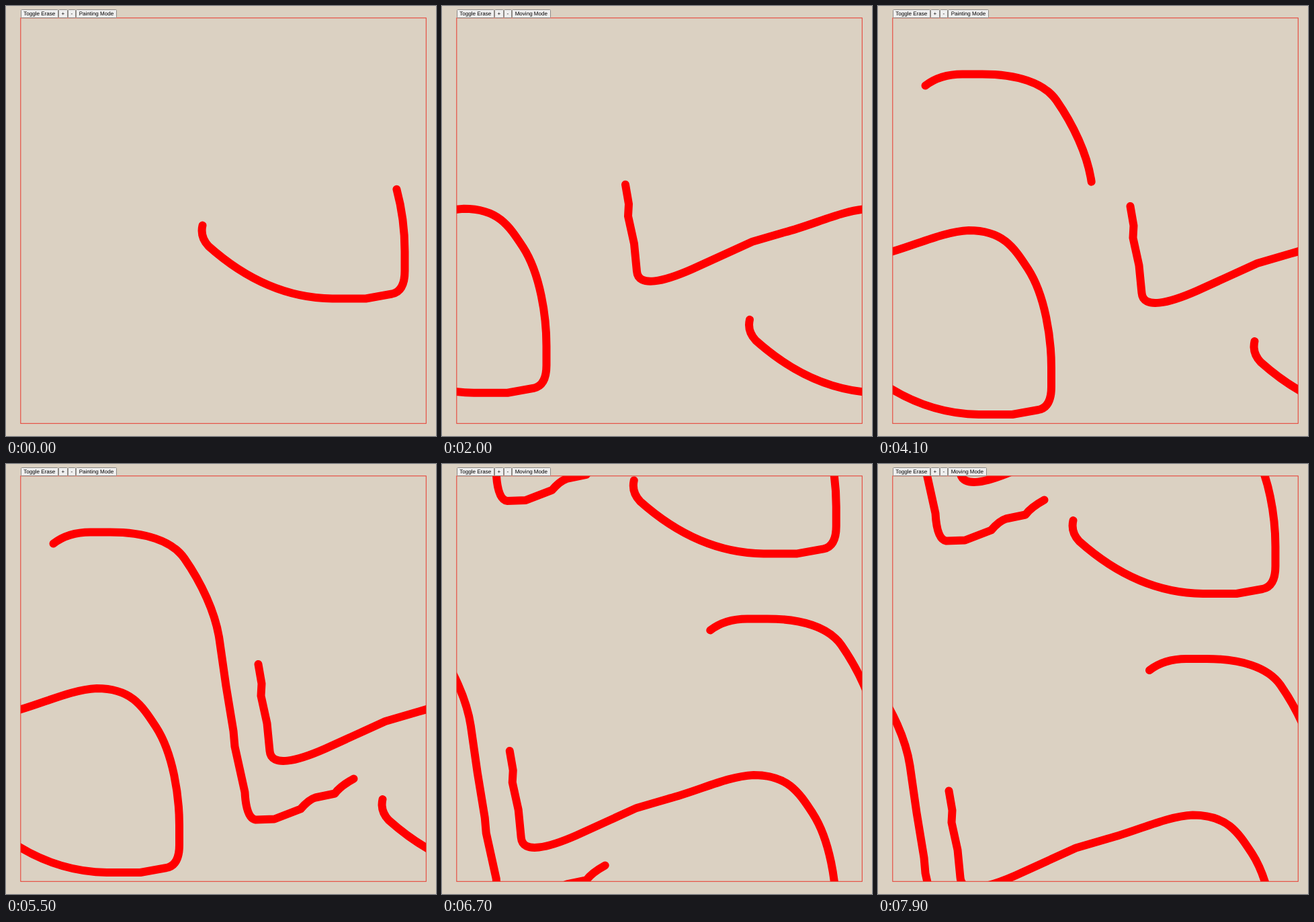
Write an HTML page that moves like this. It is 640 by 640 pixels and loops after 8 s.

```html
<!DOCTYPE html>
<html lang="en">
<head>
<meta charset="utf-8">
<title>Wrapping paint board</title>
<style>
  html, body { margin: 0; width: 100%; height: 100%; overflow: hidden; background: #dbd1c2; }
  svg { position: absolute; left: 0; top: 0; }
  .stroke {
    fill: none; stroke: #f00; stroke-width: 12;
    stroke-linecap: round; stroke-linejoin: round;
  }
  .frame { fill: none; stroke: #e8382c; }
  .bar { position: absolute; left: 21.5px; top: 5px; display: flex; }
  .bar span {
    box-sizing: border-box; height: 13px; padding: 0 3.7px;
    border: 1px solid #8d8a86; border-radius: 1.5px; background: #efefef; color: #000;
    font: 8.05px/11px "Liberation Sans", Arial, sans-serif; white-space: nowrap;
    text-rendering: geometricPrecision;
  }
</style>
</head>
<body>
<svg width="640" height="640" viewBox="0 0 640 640">
  <defs>
    <clipPath id="inside"><rect x="21.8" y="17.8" width="603.5" height="603.5"/></clipPath>
    <g id="drawing" class="stroke">
      <path id="first" pathLength="1" transform="translate(.5 .5)" d="M292,326 Q288,343 301,357
        C338,390 400,434 485,435 H535 L574,428 Q593,424 593,394 V365
        C593,322 584,258 558,218 C537,186 521,161 470,161 C430,163 390,184 344,196
        L296,210 L206,251 C165,269 126,279 124,254 L120,213 L111,172 L112,154 L107,125"/>
      <path id="second" pathLength="1" transform="translate(-267.5 -172)" d="M70,118
        Q92,101 125,101 H155 C205,101 246,113 265,140 C290,176 311,220 317,260
        L327,330 L338,397 L340,420 L355,488 Q357,527 371,529 L399,528 L438,513
        Q450,499 460,496 L489,490 Q497,479 517,468"/>
    </g>
  </defs>
  <g clip-path="url(#inside)"><g id="tiles"></g></g>
  <rect class="frame" x="21.8" y="17.8" width="603.5" height="603.5"/>
</svg>
<div class="bar"><span>Toggle Erase</span><span>+</span><span>-</span><span id="mode">Painting Mode</span></div>
<script>
const LOOP = 8000, STEP = 100, SIZE = 603.5, PAINT_TIME = 1200;
const byId = id => document.getElementById(id);

// Drags of the board: per axis a distance and how long it takes.
const drags = [
  { start: 1450, x: { by: 268, time: 950 }, y: { by: 172.5, time: 760 } },
  { start: 5900, x: { by: 51, time: 300 }, y: { by: -5.5, time: 300 } },
  { start: 6400, x: { by: 282.5, time: 325 }, y: { by: 194, time: 475 } }
];

const clamp = u => Math.min(1, Math.max(0, u));
const smooth = u => u * u * (3 - 2 * u);
const easeOut = u => 1 - (1 - u) ** 2;
const wrap = v => v % SIZE;

// Copies of the drawing on all sides make it wrap around the edges.
for (const col of [-1, 0, 1]) {
  for (const row of [-1, 0, 1]) {
    const copy = document.createElementNS('http://www.w3.org/2000/svg', 'use');
    copy.setAttribute('href', '#drawing');
    copy.setAttribute('x', col * SIZE);
    copy.setAttribute('y', row * SIZE);
    byId('tiles').append(copy);
  }
}

function paint(id, start, t) {
  const drawn = easeOut(clamp((t - start) / PAINT_TIME));
  byId(id).style.strokeDasharray = `${drawn} 2`;
  byId(id).style.visibility = drawn > 0 ? 'visible' : 'hidden';
}

function dragged(axis, t) {
  return drags.reduce((sum, drag) => {
    const { by, time } = drag[axis];
    return sum + by * smooth(clamp((t - drag.start) / time));
  }, 0);
}

function render(t) {
  paint('first', -288, t);
  paint('second', 3800, t);
  byId('tiles').setAttribute('transform', `translate(${wrap(dragged('x', t))} ${wrap(dragged('y', t))})`);
  const moving = (t >= 1400 && t < 3400) || t >= 5700;
  byId('mode').textContent = moving ? 'Moving Mode' : 'Painting Mode';
}

function tick() {
  const t = performance.now() % LOOP;
  render(Math.floor(t / STEP) * STEP);
  requestAnimationFrame(tick);
}
tick();
</script>
</body>
</html>
```
